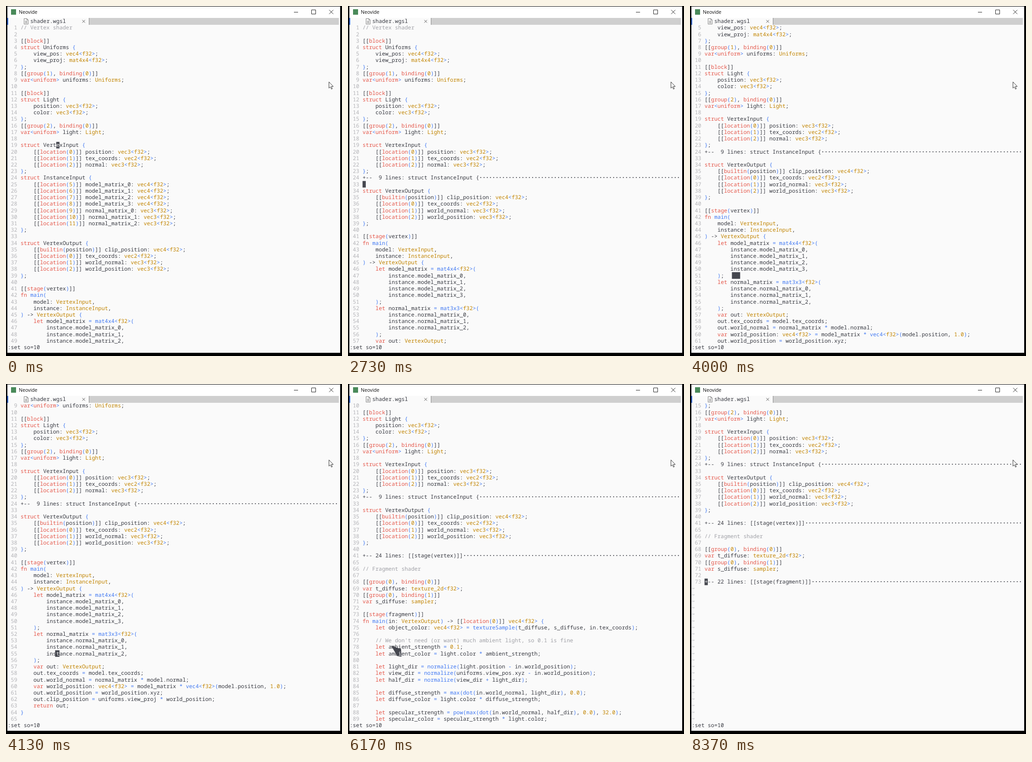
Write an HTML page that moves like this. It is 734x763 px and loops after 8410 ms.

```html
<!DOCTYPE html>
<html lang="en">
<head>
<meta charset="utf-8">
<title>Folding in an editor</title>
<style>
html, body { margin: 0; width: 100%; height: 100%; overflow: hidden; background: #000; }
#stage { position: relative; width: 734px; height: 763px; overflow: hidden; background: #000; }
#stage > * { position: absolute; }
#window { left: 3px; top: 1px; width: 727px; height: 755px; background: #fafafa; }
#titlebar { left: 3px; top: 1px; width: 727px; height: 25px; background: #fff; }
#title { left: 28px; top: 5px; font: 10.6px/16px "Open Sans", sans-serif; color: #111; }
#tabs { left: 182px; top: 26px; width: 545px; height: 15px; background: #cfcfcf; }
.mono {
  margin: 0; white-space: pre; color: #383a42;
  font: 500 11.817px/14.215px "Noto Sans Mono", "DejaVu Sans Mono", monospace;
  font-variant-ligatures: none; text-rendering: geometricPrecision;
}
#screen { left: 3.4px; top: 40.4px; }
#cursor { inset: 0; background: #45474f; color: #fafafa; }
#cursor span { position: absolute; }
svg { left: 0; top: 0; }
.note { color: #a0a1a7; }
.key { color: #e45649; }
.blue { color: #4078f2; }
.type, .num { color: #c18401; }
.gutter { color: #b4b4b8; }
.tilde { color: #a0a1a7; }
.dots { font-weight: 700; }
</style>
</head>
<body>
<div id="stage">
  <div id="window"></div>
  <div id="titlebar"></div>
  <div id="title">Neovide</div>
  <div id="tabs"></div>
  <div class="mono" style="left:53px;top:26.2px">shader.wgsl</div>
  <pre class="mono" id="screen"></pre>
  <div class="mono" style="left:3.4px;top:736.9px">:set so=10</div>
  <div class="mono" id="pending" style="left:648px;top:736.9px"></div>
  <div class="mono" id="cursor"><span></span></div>
  <svg width="734" height="763" fill="none" stroke="#222">
    <rect x="11" y="7" width="11" height="12" fill="#4a8a5a" stroke="none"/>
    <path d="M629 13.5h9M667.5 8.5h9v9h-9zM706 8.5l9 9M715 8.5l-9 9"/>
    <path d="M4 26v15" stroke="#4078f2" stroke-width="2"/>
    <path d="M181.5 26v15" stroke="#888"/>
    <path d="M39.5 27.5h6l3 3v9h-9zM45.5 27.5v3h3M41.5 33h5M41.5 35h5M41.5 37h5" stroke="#666" stroke-width=".8"/>
    <path d="M166.7 30.5l6 6M172.7 30.5l-6 6" stroke="#555"/>
    <path d="M705.5 165.5v13.5l3.2-2.8 2.2 5 2-.9-2.2-4.9h4.2z" fill="#fff" stroke="#333"/>
  </svg>
</div>
<script>
const source = `// Vertex shader

[[block]]
struct Uniforms {
    view_pos: vec4<f32>;
    view_proj: mat4x4<f32>;
};
[[group(1), binding(0)]]
var<uniform> uniforms: Uniforms;

[[block]]
struct Light {
    position: vec3<f32>;
    color: vec3<f32>;
};
[[group(2), binding(0)]]
var<uniform> light: Light;

struct VertexInput {
    [[location(0)]] position: vec3<f32>;
    [[location(1)]] tex_coords: vec2<f32>;
    [[location(2)]] normal: vec3<f32>;
};
struct InstanceInput {
    [[location(5)]] model_matrix_0: vec4<f32>;
    [[location(6)]] model_matrix_1: vec4<f32>;
    [[location(7)]] model_matrix_2: vec4<f32>;
    [[location(8)]] model_matrix_3: vec4<f32>;
    [[location(9)]] normal_matrix_0: vec3<f32>;
    [[location(10)]] normal_matrix_1: vec3<f32>;
    [[location(11)]] normal_matrix_2: vec3<f32>;
};

struct VertexOutput {
    [[builtin(position)]] clip_position: vec4<f32>;
    [[location(0)]] tex_coords: vec2<f32>;
    [[location(1)]] world_normal: vec3<f32>;
    [[location(2)]] world_position: vec3<f32>;
};

[[stage(vertex)]]
fn main(
    model: VertexInput,
    instance: InstanceInput,
) -> VertexOutput {
    let model_matrix = mat4x4<f32>(
        instance.model_matrix_0,
        instance.model_matrix_1,
        instance.model_matrix_2,
        instance.model_matrix_3,
    );
    let normal_matrix = mat3x3<f32>(
        instance.normal_matrix_0,
        instance.normal_matrix_1,
        instance.normal_matrix_2,
    );
    var out: VertexOutput;
    out.tex_coords = model.tex_coords;
    out.world_normal = normal_matrix * model.normal;
    var world_position: vec4<f32> = model_matrix * vec4<f32>(model.position, 1.0);
    out.world_position = world_position.xyz;
    out.clip_position = uniforms.view_proj * world_position;
    return out;
}

// Fragment shader

[[group(0), binding(0)]]
var t_diffuse: texture_2d<f32>;
[[group(0), binding(1)]]
var s_diffuse: sampler;

[[stage(fragment)]]
fn main(in: VertexOutput) -> [[location(0)]] vec4<f32> {
    let object_color: vec4<f32> = textureSample(t_diffuse, s_diffuse, in.tex_coords);

    // We don't need (or want) much ambient light, so 0.1 is fine
    let ambient_strength = 0.1;
    let ambient_color = light.color * ambient_strength;

    let light_dir = normalize(light.position - in.world_position);
    let view_dir = normalize(uniforms.view_pos.xyz - in.world_position);
    let half_dir = normalize(view_dir + light_dir);

    let diffuse_strength = max(dot(in.world_normal, light_dir), 0.0);
    let diffuse_color = light.color * diffuse_strength;

    let specular_strength = pow(max(dot(in.world_normal, half_dir), 0.0), 32.0);
    let specular_color = specular_strength * light.color;

    let result = (ambient_color + diffuse_color + specular_color) * object_color.xyz;

    return vec4<f32>(result, object_color.a);
}`.split("\n");

const LOOP = 8410, CELL_W = 7.09, CELL_H = 14.215, LEFT = 3.4, TOP = 40.4;
const COLUMNS = 102, ROWS = 49, SCROLL_OFF = 10, GUTTER = 4, WANTED_COL = 11;
const FOLDABLE = [[24, 32], [41, 64], [73, 94]];

// Key presses: start time, key, repeat count, gap between repeats.
// j moves down, z waits for a command, c closes the fold.
const KEYS = [
  [900, "j", 1, 0], [1400, "j", 4, 33], [1890, "z", 1, 0], [2010, "c", 1, 0],
  [2560, "j", 1, 0], [3050, "j", 12, 33], [3600, "j", 1, 0], [3862, "j", 9, 33],
  [4630, "z", 1, 0], [4740, "c", 1, 0],
  [5230, "j", 1, 0], [5330, "j", 1, 0], [5774, "j", 14, 31.5], [6217, "j", 6, 35],
  [6630, "j", 7, 33], [7300, "z", 1, 0], [7410, "c", 1, 0],
];

const SYNTAX = new RegExp([
  String.raw`(?<note>\/\/.*)`,
  String.raw`(?<key>\b(?:struct|var|let|fn|return|block|group|binding|location|builtin|stage|uniform)\b)`,
  String.raw`(?<plain>->)`,
  String.raw`(?<blue>\b[a-z]\w*(?=(?:<f32>)?\()|[<>(){}=*+-])`,
  String.raw`(?<type>(?<!struct )\b[A-Z]\w*|\b(?:vec\d|mat\dx\d|f32|sampler|texture_2d)\b)`,
  String.raw`(?<num>\b\d[\d.]*)`,
].join("|"), "g");

const paint = (kind, text) => `<span class="${kind}">${text.replace(/</g, "&lt;")}</span>`;

function highlight(text) {
  return text.replace(SYNTAX, (match, ...rest) => {
    const groups = rest[rest.length - 1];
    return paint(Object.keys(groups).find(name => groups[name] !== undefined), match);
  });
}

const foldAt = (folds, line) => folds.find(([first]) => first === line);

function foldText([first, last]) {
  const count = String(last - first + 1).padStart(3);
  return `+--${count} lines: ${source[first - 1]}`.padEnd(COLUMNS - GUTTER, "·");
}

const visibleLines = folds => source.map((_, i) => i + 1)
  .filter(line => !folds.some(([first, last]) => line > first && line <= last));

function renderScreen({ folds, top }) {
  const lines = visibleLines(folds).slice(top, top + ROWS);
  return Array.from({ length: ROWS }, (_, row) => {
    const line = lines[row];
    if (!line) return paint("tilde", "~");
    const fold = foldAt(folds, line);
    return paint("gutter", String(line).padStart(3) + " ") +
      (fold ? foldText(fold).replace(/·+/, dots => paint("dots", dots)) : highlight(source[line - 1]));
  }).join("\n");
}

function placeCursor(state) {
  const { folds, line, top } = state;
  const fold = foldAt(folds, line);
  const text = fold ? foldText(fold) : source[line - 1];
  const col = fold ? 0 : Math.max(0, Math.min(WANTED_COL, text.length - 1));
  state.glyph = text[col] || " ";
  state.x = LEFT + (GUTTER + col) * CELL_W;
  state.y = TOP + (visibleLines(folds).indexOf(line) - top) * CELL_H;
}

// Each corner eases on its own; those facing away from the motion lag behind.
const CORNERS = [[0, 0], [1, 0], [1, 1], [0, 1]];
const EASE_MS = 130, TRAIL = 0.7;

function cornerAt({ from, to, start, rate }, time) {
  const p = Math.min(1, (time - start) * rate / EASE_MS);
  const k = p >= 1 ? 1 : 1 - 2 ** (-10 * p);
  return from.map((v, i) => v + (to[i] - v) * k);
}

function aimCorners(state, previous) {
  state.corners = CORNERS.map(([cx, cy], i) => {
    const to = [state.x + cx * CELL_W, state.y + cy * CELL_H];
    const old = previous && previous.corners[i];
    if (!old) return { from: to, to, start: 0, rate: 1 };
    if (old.to[0] === to[0] && old.to[1] === to[1]) return old;
    const from = cornerAt(old, state.time);
    const dx = to[0] - from[0], dy = to[1] - from[1];
    const facing = (dx * (cx * 2 - 1) + dy * (cy * 2 - 1)) / (Math.hypot(dx, dy) * Math.SQRT2 || 1);
    return { from, to, start: state.time, rate: 1 + TRAIL * facing };
  });
}

function press(key, state) {
  const next = { ...state, pending: key === "z" ? "z" : "" };
  if (key === "c") {
    const fold = FOLDABLE.find(([first, last]) => state.line >= first && state.line <= last);
    next.folds = [...state.folds, fold];
    next.line = fold[0];
  }
  if (key === "j") {
    const lines = visibleLines(state.folds);
    const index = lines.indexOf(state.line) + 1;
    next.line = lines[index];
    next.top = Math.max(state.top, Math.min(index - (ROWS - SCROLL_OFF - 1), lines.length - ROWS));
  }
  return next;
}

function buildStates() {
  const first = { time: 0, line: 19, top: 0, folds: [], pending: "" };
  placeCursor(first);
  aimCorners(first);
  const states = [first];
  for (const [start, key, count, gap] of KEYS) {
    for (let i = 0; i < count; i++) {
      const previous = states[states.length - 1];
      const state = press(key, previous);
      state.time = start + i * gap;
      placeCursor(state);
      aimCorners(state, previous);
      states.push(state);
    }
  }
  return states;
}

const states = buildStates();
const screenEl = document.getElementById("screen");
const pendingEl = document.getElementById("pending");
const cursorEl = document.getElementById("cursor");
const glyphEl = cursorEl.firstElementChild;
let shown = null;

function show(state) {
  if (!shown || shown.top !== state.top || shown.folds !== state.folds) {
    screenEl.innerHTML = renderScreen(state);
  }
  pendingEl.textContent = state.pending;
  glyphEl.textContent = state.glyph;
  glyphEl.style.left = state.x + "px";
  glyphEl.style.top = state.y + "px";
  shown = state;
}

const origin = performance.now();

function draw() {
  const time = Math.max(0, performance.now() - origin) % LOOP;
  const state = states.filter(s => s.time <= time).pop();
  if (state !== shown) show(state);
  const points = state.corners.map(c => cornerAt(c, time).map(v => v.toFixed(2) + "px").join(" "));
  cursorEl.style.clipPath = `polygon(${points.join(",")})`;
  requestAnimationFrame(draw);
}
draw();
</script>
</body>
</html>
```
